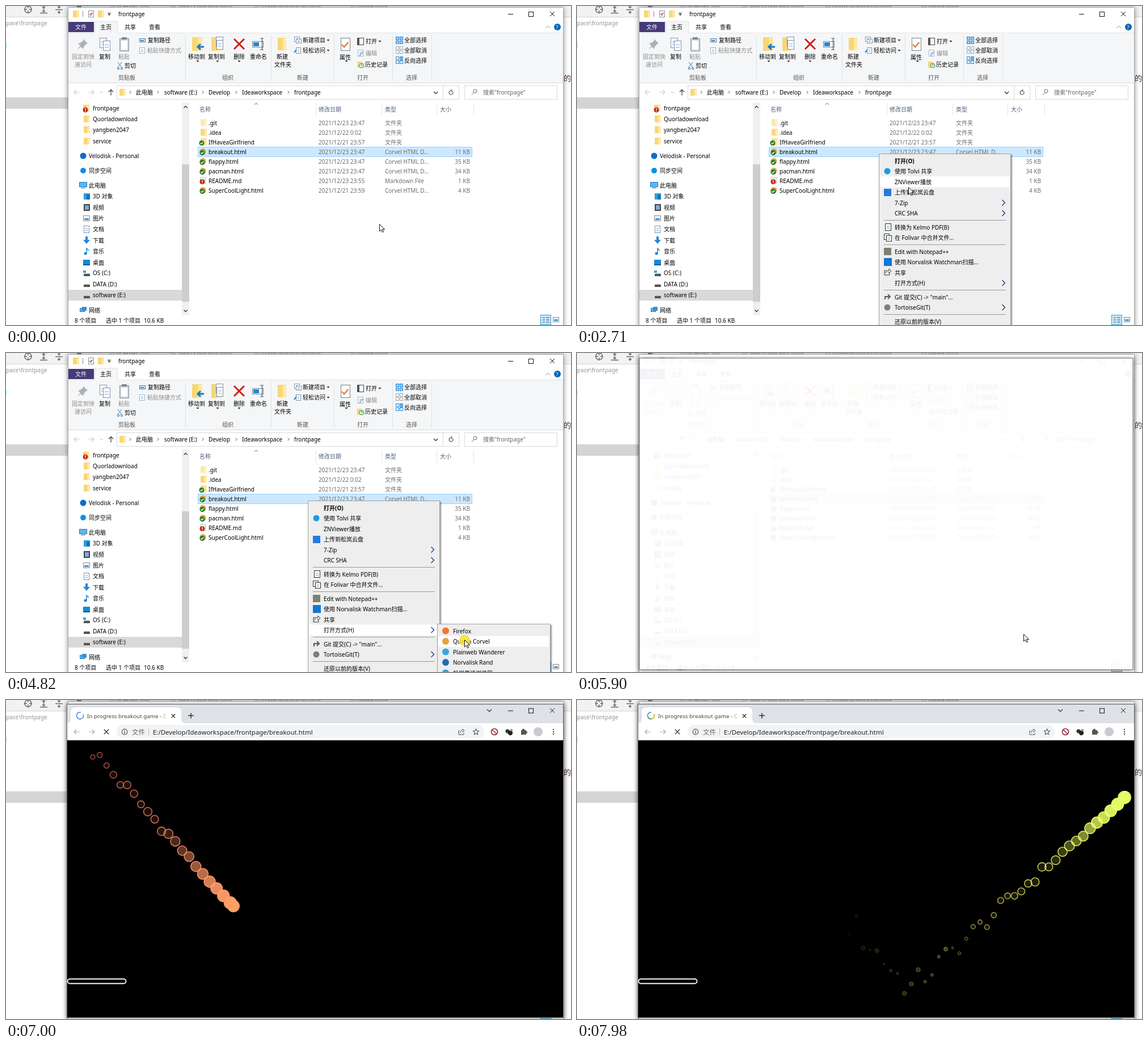
These frames come from a looping animation (996 by 562 pixels, 8 s). An HTML page:

```html
<!DOCTYPE html>
<html lang="zh-CN">
<head>
<meta charset="utf-8">
<title>frontpage</title>
<style>
html, body { margin: 0; width: 100%; height: 100%; overflow: hidden; background: #fff; }
svg { display: block; width: 100vw; height: 100vh; }
text { font-family: "Noto Sans", "Noto Sans CJK SC", "Noto Sans CJK", sans-serif; white-space: pre; }
.window { filter: drop-shadow(0 1px 4px #0007); }
.popup { filter: drop-shadow(2px 2px 1px #0006); }
</style>
</head>
<body>
<svg viewBox="0 0 996 562" xmlns="http://www.w3.org/2000/svg"></svg>
<script>
const LOOP = 8000;
const GREY = '#6d6d6d', PALE = '#a0a0a0', BLUE = '#1979ca', YELLOW = '#f8d775', BROWSER = '#e9a23b';

// Shape helpers return markup; text is placed by its vertical centre.
const rect = (x, y, w, h, fill, more = '') => `<rect x="${x}" y="${y}" width="${w}" height="${h}" fill="${fill}" ${more}/>`;
const box = (x, y, w, h, stroke, fill = 'none', more = '') => rect(x + .5, y + .5, w - 1, h - 1, fill, `stroke="${stroke}" ${more}`);
const line = (d, stroke = '#444', width = 1, fill = 'none') => `<path d="${d}" stroke="${stroke}" stroke-width="${width}" fill="${fill}"/>`;
const dot = (x, y, r, fill, more = '') => `<circle cx="${x}" cy="${y}" r="${r}" fill="${fill}" ${more}/>`;
const text = (x, y, s, fill = '#000', size = 10, more = '') =>
  `<text x="${x}" y="${y + size * .4}" fill="${fill}" font-size="${size}" ${more}>${s}</text>`;
const group = (id, content, more = '') => `<g id="${id}" ${more}>${content}</g>`;

const folder = (x, y, w = 11, h = 12) => rect(x, y, w, h, YELLOW) + rect(x + w * .6, y + 1, w * .4, h - 1, '#ffe9a6');
const page = (x, y, w, h, stroke = '#7f93a8') =>
  box(x, y, w, h, stroke, '#fff') + line(`M${x + 3} ${y + h * .4}h${w - 6}M${x + 3} ${y + h * .65}h${w - 6}`, '#6aa5d8');
const down = (x, y, fill = '#333') => `<path d="M${x - 2.5} ${y - 1}h5l-2.5 3z" fill="${fill}"/>`;
const chevron = (x, y, r = 2.5, color = '#555', width = 1) => line(`M${x - r / 2} ${y - r}l${r} ${r}l${-r} ${r}`, color, width);
const cross = (x, y, r, color = '#222', width = 1) => line(`M${x - r} ${y - r}l${2 * r} ${2 * r}M${x + r} ${y - r}l${-2 * r} ${2 * r}`, color, width);
const check = (x, y, r, color, width) => line(`M${x - r} ${y}l${r * .7} ${r * .7}l${r * 1.2} ${-r * 1.4}`, color, width);
const arrow = (x, y, dir, color) => line(`M${x - 5} ${y}h10M${x + dir} ${y - 4}L${x + 5 * dir} ${y}L${x + dir} ${y + 4}`, color, 1.2);
const okBadge = (x, y) => dot(x, y, 4.5, '#1d7b2c') + check(x, y, 2.5, '#fff', 1.3);
const alertBadge = (x, y) => dot(x, y, 4.5, '#c32b1c') + rect(x - .7, y - 3, 1.4, 3.5, '#fff') + rect(x - .7, y + 1.4, 1.4, 1.4, '#fff');
const windowButtons = y => line(`M885 ${y + .5}h9`, '#111') + box(921, y - 4, 9, 9, '#111') + cross(963, y, 4, '#111');

function backdrop() {
  const tabs = [[182, 'README.md'], [290, 'SuperCoolLight.html'], [437, 'IfHaveaGirlfriend.html'], [607, 'flappy.html']];
  return rect(0, 0, 996, 562, '#fff') + rect(0, 0, 996, 19, '#f2f2f2') + rect(0, 19, 996, 1, '#d4d4d4') +
    dot(39, 6, 6, 'none', 'stroke="#666" stroke-width="1.4"') + line('M39 -1v5M39 8v5M32 6h5M41 6h5', '#666', 1.4) +
    line('M60 -.5h13M60 12.5h13M66.5 1v9M64 3.5l2.5-2.5l2.5 2.5M64 8l2.5 2.5l2.5-2.5M87 6.5h13M93.5 -1v4M91 1l2.5 2.5l2.5-2.5M93.5 14v-4M91 12l2.5-2.5l2.5 2.5', '#666', 1.3) +
    dot(129, 2, 4, '#777') + tabs.map(([x, s]) => text(x, -1, '▤ ' + s, '#777')).join('') +
    text(0, 29.5, 'pace\\frontpage', '#8f9a94') + rect(0, 65, 1, 9, '#8fe6f2') +
    rect(0, 161, 110, 20, '#d4d4d4') + text(983, 127, '的', '#4b352d', 13);
}

function ribbon() {
  const labels = [
    [164, 89, '复制'], [250, 60, '复制路径'], [209, 105, '剪切'], [321, 89, '移动到'], [356, 89, '复制到'], [401, 89, '删除'],
    [430, 89, '重命名'], [477, 89, '新建'], [473, 103, '文件夹'], [523, 60, '新建项目'], [523, 78, '轻松访问'], [588, 90, '属性'],
    [634, 62, '打开'], [633, 103, '历史记录'], [702, 60, '全部选择'], [702, 78, '全部取消'], [702, 96, '反向选择']];
  const faint = [[116, 89, '固定到快'], [121, 103, '速访问'], [198, 89, '粘贴'], [249, 78, '粘贴快捷方式'], [634, 83, '编辑']];
  const groups = [[198, '剪贴板'], [381, '组织'], [513, '新建'], [619, '打开'], [705, '选择']];
  const drops = [[338, 97], [373, 97], [411, 97], [600, 97], [568, 60], [568, 78], [659, 62]];
  const tiles = (y, color, fill) => [0, 7].map(dx => [0, 7].map(dy => box(687 + dx, y - 7 + dy, 6, 6, color, fill)).join('')).join('');
  return rect(110, 48, 872, 87, '#f5f6f7') + rect(110, 47, 872, 1, '#e2e3e4') + rect(110, 135, 872, 1, '#dadbdc') +
    rect(110, 28, 45, 18, '#473a78') + text(122, 37, '文件', '#fff') +
    rect(156, 27, 41, 21, '#f5f6f7') + line('M156.5 47v-20h40v20', '#dfe0e1') +
    text(166, 37, '主页') + text(209, 37, '共享') + text(252, 37, '查看') +
    line('M951 39l4-4l4 4', PALE) + dot(972, 37, 6, '#0867b8') + text(969.5, 37, '?', '#fff', 9) +
    [316, 467, 578, 681, 750].map(x => rect(x, 51, 1, 81, '#e0e1e2')).join('') +
    `<path d="M136 58l8 8l-3 1l-4 5l-1 4l-4-4l-6 5l5-7l-4-4l4-1l5-4z" fill="#a9b2ba"/>` +
    page(165, 56, 13, 18) + page(171, 61, 13, 18) +
    box(200, 57, 17, 23, '#8596a8', '#c9d3dd') + rect(203, 61, 11, 16, '#fff') + rect(204, 55, 9, 4, '#7a8998') +
    box(235, 57, 11, 7, '#4d7da6', '#d8eaf8') + rect(237, 60, 6, 2, '#4d7da6') +
    page(235, 73, 10, 11, '#9db0c2') + line('M197 99l7 9M204 99l-7 9', '#50728f') + dot(198, 110, 1.7, 'none', 'stroke="#1979ca"') + dot(204, 110, 1.7, 'none', 'stroke="#1979ca"') +
    folder(328, 55, 18, 24) + line('M349 72h-10M343 67l-5 5l5 5', BLUE, 3) +
    folder(362, 55, 17, 24) + page(370, 54, 13, 17) + page(371, 60, 12, 17) +
    cross(411, 67, 9, '#d01c12', 3) + box(434, 62, 20, 11, '#6d7f90', '#fff') + rect(436, 64, 10, 7, '#2584d4') + line('M448 57h6M451.5 57v20M448 77h6', '#555', 1.2) +
    folder(479, 56, 15, 22) + page(508, 54, 10, 9) + page(511, 58, 10, 8) + page(511, 73, 9, 11) + line('M508 82l4-5', BLUE, 2) +
    box(590, 56, 17, 23, '#75818c', '#fff') + check(598, 68, 6, '#e5762b', 2.3) +
    box(619, 56, 12, 13, '#444', '#fff') + rect(620, 57, 3, 11, '#555') + page(620, 77, 10, 12, '#a8b7c5') + line('M623 88l7-8', '#a0b8cc', 2) +
    folder(619, 98, 9, 11) + dot(627, 105, 4, '#e8f3e8', 'stroke="#328b40"') + line('M627 102v3h2', '#328b40') +
    tiles(61, '#2584d4', '#9fcdf0') + tiles(78, '#9aa8b4', '#fff') + tiles(96, '#2584d4', '#fff') + rect(694, 90, 6, 6, '#66aee4') +
    drops.map(p => down(...p)).join('') + labels.map(l => text(...l)).join('') +
    faint.map(l => text(...l, '#8b8b8b')).join('') + groups.map(([x, s]) => text(x, 126, s, '#555')).join('');
}

function sidebar() {
  const drive = y => rect(137, y, 11, 4, '#555') + rect(138, y - 1, 9, 1, '#bbb');
  const places = [
    [180, 'frontpage', folder(136, 174) + alertBadge(140, 183)], [199, 'Quorladownload', folder(137, 193)],
    [218, 'yangben2047', folder(137, 212)], [238, 'service', folder(137, 232)],
    [263.5, 'Velodisk - Personal', dot(136, 264, 5.5, '#0a6cce'), 146], [290, '同步空间', dot(136, 290, 5, '#0c8ee8'), 146],
    [315.5, '此电脑', box(129, 310, 14, 9, '#1979ca', '#5db8f0') + rect(132, 320, 8, 1, '#456'), 146],
    [335, '3D 对象', rect(137, 330, 11, 11, '#2c9fe0') + rect(142, 332, 6, 9, '#1574b8')],
    [354.5, '视频', rect(137, 349, 11, 12, '#444') + rect(139, 351, 7, 8, '#7ea9d6')],
    [374, '图片', box(136, 369, 12, 10, '#888', '#fff') + rect(138, 374, 8, 3, '#3f91cf')],
    [393, '文档', page(137, 387, 10, 13)],
    [412.5, '下载', line('M142 406v6', '#2786d8', 4) + `<path d="M136 412h12l-6 7z" fill="#2786d8"/>`],
    [432, '音乐', dot(140, 436, 2.5, '#1787dc') + line('M142 436v-9l4 4', '#1787dc', 1.5)],
    [451.5, '桌面', rect(136, 447, 12, 10, '#118bd6') + rect(136, 455, 12, 2, '#0a5d9d')],
    [470, 'OS (C:)', drive(472) + rect(136, 466, 5, 4, '#25a3e8')], [490, 'DATA (D:)', drive(491)], [509, 'software (E:)', drive(511)],
    [535.5, '网络', box(130, 532, 9, 7, '#287cba', '#55b5ee') + rect(134, 530, 8, 7, '#3a8ed0'), 146]];
  return rect(110, 500, 200, 19, '#d9d9d9') + places.map(([y, s, icon, x = 153]) => icon + text(x, y, s)).join('') +
    rect(310, 170, 13, 375, '#f0f0f0') + rect(310, 279, 13, 242, '#cdcdcd') +
    line('M313.5 179.5l3-3l3 3M313.5 535.5l3 3l3-3', '#333', 1.3) +
    text(121, 553.5, '8 个项目') + text(176, 553.5, '选中 1 个项目') + text(243, 553.5, '10.6 KB');
}

function fileList() {
  const html = y => dot(347, y, 5.5, BROWSER) + okBadge(346, y + 2);
  const dir = y => folder(343, y - 6);
  const kind = 'Corvel HTML D...';
  const files = [
    ['.git', '23 23:47', '文件夹', '', y => `<g opacity=".55">${dir(y)}</g>`], ['.idea', '22 0:02', '文件夹', '', dir],
    ['IfHaveaGirlfriend', '21 23:57', '文件夹', '', y => dir(y) + okBadge(345, y + 2)],
    ['breakout.html', '23 23:47', kind, '11 KB', html], ['flappy.html', '23 23:47', kind, '35 KB', html],
    ['pacman.html', '23 23:47', kind, '34 KB', html],
    ['README.md', '23 23:55', 'Markdown File', '1 KB', y => page(342, y - 6, 10, 12, '#bbb') + alertBadge(346, y + 2)],
    ['SuperCoolLight.html', '21 23:59', kind, '4 KB', html]];
  return [[341, '名称'], [551, '修改日期'], [668, '类型'], [765, '大小']].map(([x, s]) => text(x, 181.5, s, '#4c607a')).join('') +
    [546, 662, 759, 824].map(x => rect(x, 171, 1, 22, '#e5e5e5')).join('') + line('M438 174l3-3l3 3', '#666') +
    group('rowHover', rect(338, 0, 483, 17, '#e5f3ff')) + box(338, 248, 484, 18, '#99d1ff', '#cce8ff') +
    files.map(([name, date, type, size, icon], i) => {
      const y = 205.5 + 17 * i;
      return icon(y) + text(357, y, name) + text(551, y, '2021/12/' + date, GREY) + text(668, y, type, GREY) +
        text(818, y, size, GREY, 10, 'text-anchor="end"');
    }).join('');
}

function explorer() {
  const path = [[229, '此电脑'], [279, 'software (E:)'], [357, 'Develop'], [416, 'Ideaworkspace'], [508, 'frontpage']];
  return rect(109, 2, 874, 570, '#fff', 'class="window"') + line('M109.5 562V2.5H982.5V562', '#a9a9a9') +
    folder(118, 8) + rect(135, 9, 1, 10, '#888') + page(145, 8, 10, 12) + check(150, 14, 3, '#d33', 1.2) + folder(162, 8) +
    rect(179, 12, 6, 1, '#333') + down(182, 15) + text(198, 14, 'frontpage') + windowButtons(14) + ribbon() +
    arrow(125, 152, -1, '#ccc') + arrow(150, 152, 1, '#ccc') + line('M166 151l2.5 2.5l2.5-2.5', '#bbb') +
    line('M185 157.5v-10M181 151.5l4-4l4 4', '#444', 1.3) + box(195, 140, 576, 25, '#d9d9d9') + box(770, 140, 29, 25, '#d9d9d9') +
    folder(200, 146) + [219, 268, 347, 406, 498].map(x => chevron(x, 152)).join('') +
    path.map(([x, s]) => text(x, 152, s)).join('') + line('M754 151l3.5 3.5l3.5-3.5', '#333', 1.3) +
    line('M787.5 150.5a3.5 3.5 0 1 1-3-1.5l2-2m-2 2l2 2', '#555', 1.2) + box(808, 140, 164, 25, '#d9d9d9') +
    dot(827, 150, 3, 'none', 'stroke="#666"') + line('M825 152.5l-4 4', '#666') + text(841, 152, '搜索"frontpage"', '#666') +
    sidebar() + fileList() +
    box(942, 544, 19, 18, '#2e9fd9', '#cbe8f6') + line('M946 549h4M946 553h4M946 557h4M952 549h6M952 553h6M952 557h6', '#447') +
    box(964, 548, 11, 9, '#888', '#fff') + rect(966, 552, 7, 3, '#4c95c8');
}

const menuRows = [
  [272.5, '打开(O)'], [291, '使用 Tolvi 共享', dot(547, 291, 5.5, '#1c9ae4')], [309.5, 'ZNViewer播放'],
  [328, '上传到松岚云盘', rect(541, 322, 13, 13, '#217be0')], [346.5, '7-Zip'], [365, 'CRC SHA'],
  [389.5, '转换为 Kelmo PDF(B)', page(543, 383, 11, 13, '#333')],
  [408, '在 Folivar 中合并文件...', page(541, 401, 10, 11, '#333') + page(545, 404, 10, 11, '#333')],
  [432.5, 'Edit with Notepad++', rect(541, 426, 13, 13, '#7b8275')],
  [451, '使用 Norvalisk Watchman扫描...', rect(541, 444, 14, 14, '#0f78d4')],
  [469.5, '共享', line('M546 466h-4v8h9v-3M544 471q1-5 6-5v-3l4 4l-4 4v-3', '#333')], [488, '打开方式(H)'],
  [512.5, 'Git 提交(C) -&gt; "main"...', line('M543 517v-5h7M548 508l4 4l-4 4', '#555', 2)],
  [531, 'TortoiseGit(T)', dot(547, 531, 5.5, '#77808a')], [555.5, '还原以前的版本(V)']];
const openWithRow = 488;
const browserRows = [
  [489.5, 'Firefox', '#f2762e'], [508, 'Quorla Corvel', BROWSER], [526.5, 'Plainweb Wanderer', '#3aa5e0'],
  [545, 'Norvalisk Rand', '#1a6fb0'], [563.5, '松岚高速浏览器', '#2fa0e8']];

const contextMenu = () => box(532, 260, 233, 320, '#a0a0a0', '#eee', 'class="popup"') +
  group('menuHover', rect(534, 0, 229, 19, '#fff')) +
  [377, 420, 500, 543].map(y => rect(541, y, 215, 1, '#999')).join('') +
  [346.5, 365, 488, 531].map(y => chevron(752, y, 5, '#123a70', 1.3)).join('') +
  menuRows.map(([y, s, icon = ''], i) => icon + text(560, y, s, '#000', 10, i ? '' : 'font-weight="700"')).join('');

const browserMenu = () => box(760, 477, 200, 100, '#a0a0a0', '#eee', 'class="popup"') +
  group('browserHover', rect(762, 0, 195, 19, '#fff')) +
  browserRows.map(([y, s, color]) => dot(775, y, 6, color) + text(788, y, s)).join('');

function browser() {
  const ring = (color, dash, id) => dot(0, 0, 6, 'none', `id="${id}" stroke="${color}" stroke-width="1.6" stroke-dasharray="${dash}"`);
  const ui = rect(108, 8, 874, 34, '#dee1e6') +
    '<path d="M107 41q7 0 7-7V21q0-8 8-8H301q8 0 8 8V34q0 7 7 7z" fill="#fff"/>' + rect(108, 41, 874, 30, '#fff') +
    `<g transform="translate(130.5 27.5)">${group('spinner', ring('#4c80dc', '31 7', 'blueArc') + ring('#e9c52e', '12 26', 'yellowArc') + ring('#50a568', '0 12 9 17', 'greenArc'))}</g>` +
    text(143, 28, 'In progress breakout game - <tspan fill="#aaa">C</tspan>', '#444', 9.8) + cross(295, 28, 3.2, '#333', 1.3) +
    line('M326 23v9.5M321 27.5h10', '#333', 1.5) + line('M848 16.5l4 4l4-4', '#333', 1.2) + windowButtons(18.5) +
    arrow(125, 56, -1, '#aaa') + arrow(151, 56, 1, '#aaa') + cross(177, 56, 4.2, '#444', 1.5) +
    rect(195, 44, 648, 23, '#f1f3f4', 'rx="11.5"') + dot(209, 56, 4.8, 'none', 'stroke="#555" stroke-width="1.2"') + rect(208.4, 55, 1.3, 4, '#555') + rect(208.4, 53, 1.3, 1.3, '#555') +
    text(222, 56, '文件', '#666', 11.5) + rect(251, 50, 1, 12, '#bbb') +
    text(259, 56, 'E:/Develop/Ideaworkspace/frontpage/breakout.html', '#222', 11.45) +
    line('M800 54h-2v7h9v-3M801 58q0-5 4-5v-2l3 3l-3 3v-2', '#555') +
    line('M828.5 51l1.5 3.3l3.5.4l-2.6 2.4l.7 3.5l-3.1-1.7l-3.1 1.7l.7-3.5l-2.6-2.4l3.5-.4z', '#555', 1.1) +
    dot(861, 56, 5.5, '#fff', 'stroke="#8d2730" stroke-width="1.6"') + line('M857 52l8 8', '#8d2730', 1.5) +
    dot(884, 55, 3.5, '#333') + dot(889, 58, 4.2, '#222') + dot(891, 53, 2.2, '#999') +
    rect(908, 53, 9, 8, '#555') + dot(912, 52.5, 2, '#555') + dot(917, 57, 2, '#555') + dot(938, 56, 8, '#c9cbcd') +
    [52, 56, 60].map(y => dot(965, y, 1.2, '#444')).join('');
  const game = rect(108, 71, 874, 488, '#000') + group('trail', '') +
    rect(108.5, 491.5, 103, 8, '#000', 'rx="4" stroke="#f4fff4" stroke-width="1.8"');
  return box(107, 7, 876, 553, '#666', '#fff', 'class="window"') + group('browserUi', ui) + group('game', game);
}

document.querySelector('svg').innerHTML = backdrop() + explorer() + group('menu', contextMenu()) + group('submenu', browserMenu()) +
  group('browserWindow', browser()) + group('pointer',
    group('click', dot(.5, 1.5, 10, '#f6e22f', 'opacity=".85"')) +
    group('busy', dot(0, 0, 6, '#d9efff', 'stroke="#248be3" stroke-width="4.5"') + line('M0-6A6 6 0 0 1 6 0', '#58b2f5', 4.5)) +
    group('arrow', '<path d="M.5.5V13l3-2.8l2 4.5l2-.9l-2-4.3h4z" fill="#fff" stroke="#111"/>'));

const el = Object.fromEntries([...document.querySelectorAll('[id]')].map(node => [node.id, node]));
const show = (node, visible) => node.setAttribute('opacity', Number(visible));
const move = (node, x, y) => node.setAttribute('transform', `translate(${x} ${y})`);
const smooth = p => p * p * (3 - 2 * p);
const random = (n, salt) => { const v = Math.sin(n * 12.9898 + salt * 78.233) * 43758.5453; return v - Math.floor(v); };

// Progress in n equal jumps: the first at `start`, the last at `end`; the slack absorbs 10 ms rounding.
function ramp(t, start, end, n) {
  if (t < start) return 0;
  return Math.min(n, Math.floor((t - start) / (end - start) * (n - 1) + 1.15)) / n;
}

function highlight(node, rows, y) {
  const row = rows.find(([centre]) => y >= centre - 9.5 && y < centre + 10);
  show(node, Boolean(row));
  if (row) move(node, 0, row[0] - 9.5);
}

function drawTrail(t) {
  const spacing = 12.12, startX = 153, floorY = 548;
  const now = Math.floor(t / 70) * 70;
  const headX = 401 + .5762 * (now - 7000);
  const hue = 22 + (now - 7000) * .05;
  const heightAt = x => { const y = 363 + (x - 401) * .995; return y > floorY ? 2 * floorY - y : y; };
  if (headX < startX) { el.trail.innerHTML = ''; return; }
  const newest = Math.floor((headX - startX) / spacing);
  let marks = '';
  for (let k = Math.max(0, newest - 40); k <= newest; k++) {
    const x = startX + k * spacing, age = (headX - x) / spacing;
    const drift = age * Math.min(1, age / 8) * (.5 + 1.5 * random(k, 1));
    const radius = Math.max(1.5 + 2.5 * random(k, 2), 11 * (1 - age / 34) + (random(k, 3) - .5) * age * .1);
    const fill = age > 26 ? .6 : Math.max(.15, Math.exp(-((age / 8) ** 2)));
    const color = `hsl(${hue - age * .7} 100% 70%)`;
    marks += dot(x, heightAt(x) - drift, radius, color,
      `fill-opacity="${fill}" stroke="${color}" stroke-width="${radius > 3 ? 1.6 : 1}" opacity="${Math.min(1, 1.1 - age / 39)}"`);
  }
  el.trail.innerHTML = marks + dot(headX, heightAt(headX), 11, `hsl(${hue} 100% 70%)`);
}

function draw(t) {
  const toFile = smooth(ramp(t, 460, 1020, 9)), downMenu = ramp(t, 2430, 3050, 10);
  const toSub = smooth(ramp(t, 3460, 3870, 7)), toBrowser = smooth(ramp(t, 4130, 4550, 7)), away = smooth(ramp(t, 4890, 5560, 11));
  const x = 658 - 126 * toFile + 93 * downMenu + 22 * downMenu ** 2 + 165 * toSub - 4 * toBrowser - 21 * away;
  const y = 384 - 125 * toFile + 14 * downMenu + 212 * downMenu ** 2 + 4 * toSub + 16 * toBrowser - 10 * away;
  const waiting = t >= 1680 && t < 1880;
  move(el.pointer, x, y);
  show(el.pointer, t < 6440);
  show(el.busy, waiting);
  show(el.arrow, !waiting);
  show(el.click, (t >= 1350 && t < 1480) || (t >= 4820 && t < 4890));

  const row = Math.floor((y - 197) / 17);
  show(el.rowHover, t < 1800 && row >= 0 && row < 8);
  move(el.rowHover, 0, 197 + 17 * row);

  const closing = ramp(t, 4890, 5100, 4), inSubmenu = x >= 761;
  show(el.menu, ramp(t, 1880, 2150, 5) - closing);
  show(el.submenu, ramp(t, 3250, 3450, 4) - closing);
  highlight(el.menuHover, menuRows, downMenu === 0 ? 0 : inSubmenu ? openWithRow : y);
  highlight(el.browserHover, browserRows, inSubmenu ? y : 0);

  const opening = 1 - (1 - ramp(t, 5630, 5970, 6)) ** 1.6;
  show(el.browserWindow, opening);
  el.browserWindow.setAttribute('transform', `translate(545 283.5) scale(${.9 + .1 * opening}) translate(-545 -283.5)`);
  show(el.browserUi, t >= 6170);
  show(el.game, t >= 6440);
  el.spinner.setAttribute('transform', `rotate(${Math.floor(t / 70) * 25 % 360})`);
  show(el.yellowArc, t >= 7770);
  show(el.greenArc, t >= 7770);
  drawTrail(t);
}

function tick() {
  draw(performance.now() % LOOP);
  requestAnimationFrame(tick);
}
tick();
</script>
</body>
</html>
```
